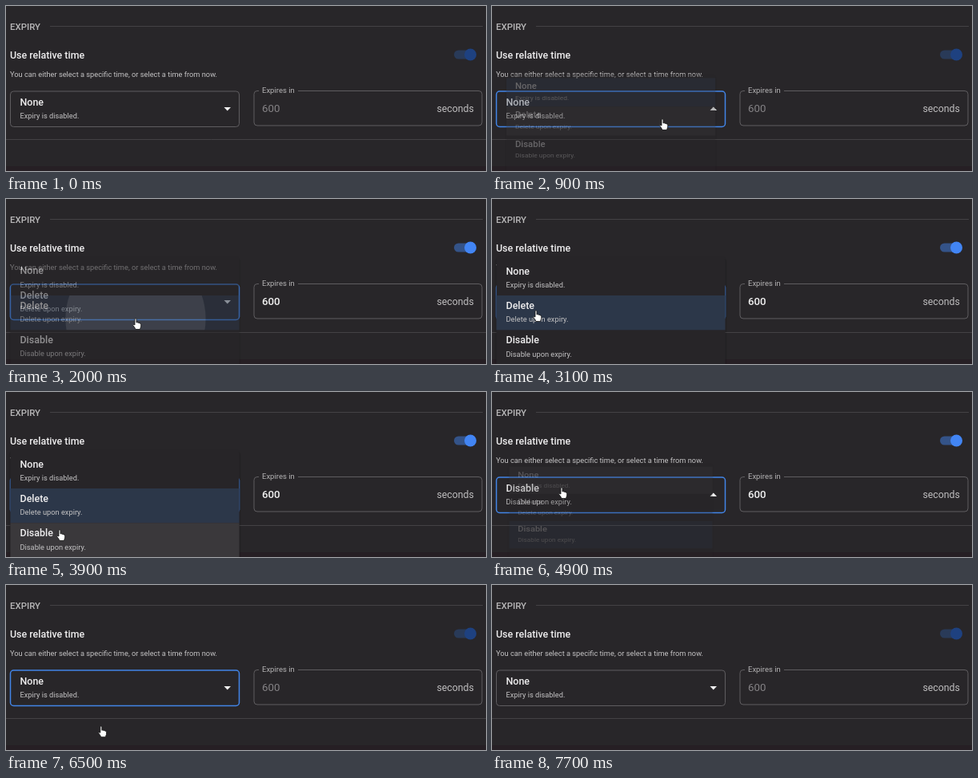
Recreate the animation shown at these times as an HTML page. Size 600 by 207 pixels, loop 7.8 s.

```html
<!DOCTYPE html>
<html lang="en">
<head>
<meta charset="utf-8">
<title>Expiry settings</title>
<style>
  html, body { margin: 0; width: 100%; height: 100%; overflow: hidden; background: #282629; }
  svg { display: block; width: 100%; height: 100%; font-family: Roboto, "Open Sans", sans-serif; }
  .title { font-size: 12.45px; font-weight: 500; fill: #efeeef; }
  .note { font-size: 9.27px; fill: #c4c3c4; }
  .line { fill: none; stroke: #444245; }
  .box { fill: none; stroke: #5f5d60; }
</style>
</head>
<body>
<svg viewBox="0 0 600 207">
  <defs>
    <clipPath id="itemClip"><rect id="clipRect" x="5.5" width="286" height="43.3"/></clipPath>
  </defs>
  <rect width="600" height="207" fill="#282629"/>
  <rect y="201" width="600" height="6" fill="#261f24"/>

  <text x="5" y="29.7" font-size="11.4" font-weight="500" fill="#b9b8b9">EXPIRY</text>
  <path class="line" d="M55 25.5H596M0 167.5H600"/>
  <text class="title" x="5" y="65.7">Use relative time</text>
  <text class="note" x="5" y="88.7">You can either select a specific time, or select a time from now.</text>

  <rect id="track" x="560" y="55.5" width="27" height="11" rx="5.5"/>
  <circle id="thumb" cx="580.5" cy="61" r="7.5"/>

  <rect id="select" class="box" x="5.5" y="107" width="286" height="44.5" rx="4"/>
  <text id="value" class="title" x="17.5" y="124.7"></text>
  <text id="valueNote" class="note" x="17.5" y="140.5"></text>
  <path id="arrow" fill="#f2f2f2"/>

  <path class="box" d="M316 106.5H314a4 4 0 0 0-4 4V146a4 4 0 0 0 4 4H591a4 4 0 0 0 4-4V110.500a4 4 0 0 0-4-4H365"/>
  <text x="320" y="109.300" font-size="9.5" fill="#b5b4b5">Expires in</text>
  <text id="amount" x="320" y="133.3" font-size="13.3">600</text>
  <text x="538.5" y="133" font-size="12.3" fill="#bfbebf">seconds</text>

  <g id="menu">
    <rect x="3.5" y="73" width="290" height="165" rx="6" fill="#000" opacity=".1"/>
    <rect x="5.5" y="72" width="286" height="163" rx="4" fill="#272528"/>
    <g id="items"></g>
    <circle id="ripple" fill="#fff" fill-opacity=".17" clip-path="url(#itemClip)"/>
  </g>

  <path id="hand" fill="#fff" stroke="#111" stroke-width=".8" stroke-linejoin="round"
    d="M3 1.500Q4-.2 5 1.500V6Q6.300 5 7.200 6.400Q8.400 5.700 9 7Q10.600 6.500 10.700 8.200V11Q10 12.500 9.500 14.500H4Q3 12 .8 9.500Q.2 7.500 3 9Z"/>
</svg>
<script>
const LOOP = 7800, STEP = 100;
const ITEM_TOP = 77.7, ITEM_HEIGHT = 43.3, MENU_TIME = 250, RIPPLE_TIME = 550;
const NONE = 0, DELETE = 1, DISABLE = 2;
const OPTIONS = [
  ["None", "Expiry is disabled."],
  ["Delete", "Delete upon expiry."],
  ["Disable", "Disable upon expiry."]
];

// Each visit to the menu: opened, pressed, released, choice, ripple centre and radius
const VISITS = [
  { open: 830, press: 1795, close: 1915, pick: DELETE, x: 162, y: 150, r: 158 },
  { open: 2860, press: 4210, close: 4320, pick: DISABLE, x: 67, y: 174, r: 222 },
  { open: 4838, press: 5915, close: 6040, pick: NONE, x: 92, y: 105, r: 202 }
];
const FOCUS_END = 7700;

const CURSOR = [
  [300, 240, 170], [700, 209, 141], [1200, 209, 141], [1600, 158, 149],
  [2100, 158, 149], [2700, 51, 139], [3200, 51, 139], [3600, 63, 172],
  [4400, 63, 172], [4800, 83, 119], [5000, 83, 119], [5300, 87, 105],
  [6200, 87, 105], [6700, 130, 215]
];

const $ = id => document.getElementById(id);
const set = (node, attrs) => {
  for (const key in attrs) node.setAttribute(key, attrs[key]);
  return node;
};
const add = (parent, tag, attrs) =>
  parent.appendChild(set(document.createElementNS("http://www.w3.org/2000/svg", tag), attrs));
const clamp = x => Math.min(1, Math.max(0, x));
const mix = (a, b, p) => a + (b - a) * p;

// cubic-bezier(.4, 0, .2, 1), solved by bisection
function ease(x) {
  x = clamp(x);
  let low = 0, high = 1;
  for (let i = 0; i < 20; i++) {
    const u = (low + high) / 2, v = 1 - u;
    if (1.2 * u * v * v + 0.6 * u * u * v + u ** 3 < x) low = u; else high = u;
  }
  return low * low * (3 - 2 * low);
}

const rows = OPTIONS.map(([name, note], i) => {
  const y = ITEM_TOP + i * ITEM_HEIGHT;
  const back = add($("items"), "rect", { x: 5.5, y, width: 286, height: ITEM_HEIGHT });
  add($("items"), "text", { class: "title", x: 17.5, y: y + 16.8 }).textContent = name;
  add($("items"), "text", { class: "note", x: 17.5, y: y + 33.2 }).textContent = note;
  return back;
});

function cursorAt(t) {
  const next = CURSOR.findIndex(key => key[0] > t);
  if (next < 1) return null;
  const [t0, x0, y0] = CURSOR[next - 1], [t1, x1, y1] = CURSOR[next];
  const u = (t - t0) / (t1 - t0), p = u * u * (3 - 2 * u);
  return { x: mix(x0, x1, p), y: mix(y0, y1, p) };
}

function drawMenu(t, visit, selected, hovered) {
  const closing = t >= visit.close;
  const time = (t - (closing ? visit.close : visit.open)) / MENU_TIME;
  const fade = ease(time);
  const grow = closing ? 1 - ease((time - 1 / 3) * 1.5) : ease(time * 1.5);
  const scale = mix(0.75, 1, grow);
  set($("menu"), {
    opacity: closing ? 1 - fade : fade,
    transform: `translate(149 153.5) scale(${scale} ${scale * scale}) translate(-149 -153.5)`
  });
  rows.forEach((row, i) => set(row, {
    fill: i === selected ? "#2c3749" : i === hovered ? "#3a383b" : "none"
  }));
  set($("clipRect"), { y: ITEM_TOP + visit.pick * ITEM_HEIGHT });
  set($("ripple"), { cx: visit.x, cy: visit.y, r: visit.r * ease((t - visit.press) / RIPPLE_TIME) });
}

function draw(t) {
  const done = VISITS.filter(v => t >= v.close);
  const selected = done.length ? done[done.length - 1].pick : NONE;
  const visit = VISITS.find(v => t >= v.open && t < v.close + MENU_TIME);
  const isOpen = visit && t < visit.close;
  const enabled = selected !== NONE;
  const focused = t >= VISITS[0].open && t < FOCUS_END;

  $("value").textContent = OPTIONS[selected][0];
  $("valueNote").textContent = OPTIONS[selected][1];
  set($("select"), {
    style: focused ? "stroke:#4285e8;stroke-width:1.5" : ""
  });
  set($("arrow"), { d: isOpen ? "M272.500 131h8.500l-4.250-4.500z" : "M272.500 127h8.500l-4.250 4.500z" });
  set($("track"), { fill: enabled ? "#345388" : "#293a58" });
  set($("thumb"), { fill: enabled ? "#4285f4" : "#1e4180" });
  set($("amount"), { fill: enabled ? "#f2f2f2" : "#858386", "font-weight": enabled ? 500 : 400 });

  const cursor = cursorAt(t);
  $("hand").style.display = cursor ? "" : "none";
  if (cursor) set($("hand"), { transform: `translate(${cursor.x} ${cursor.y})` });

  $("menu").style.display = visit ? "" : "none";
  if (visit) {
    const hovered = cursor ? Math.floor((cursor.y + 1 - ITEM_TOP) / ITEM_HEIGHT) : -1;
    drawMenu(t, visit, selected, hovered);
  }
}

const start = performance.now();
function tick() {
  const t = (performance.now() - start) % LOOP;
  draw(Math.floor(t / STEP) * STEP);
  requestAnimationFrame(tick);
}
tick();
</script>
</body>
</html>
```
